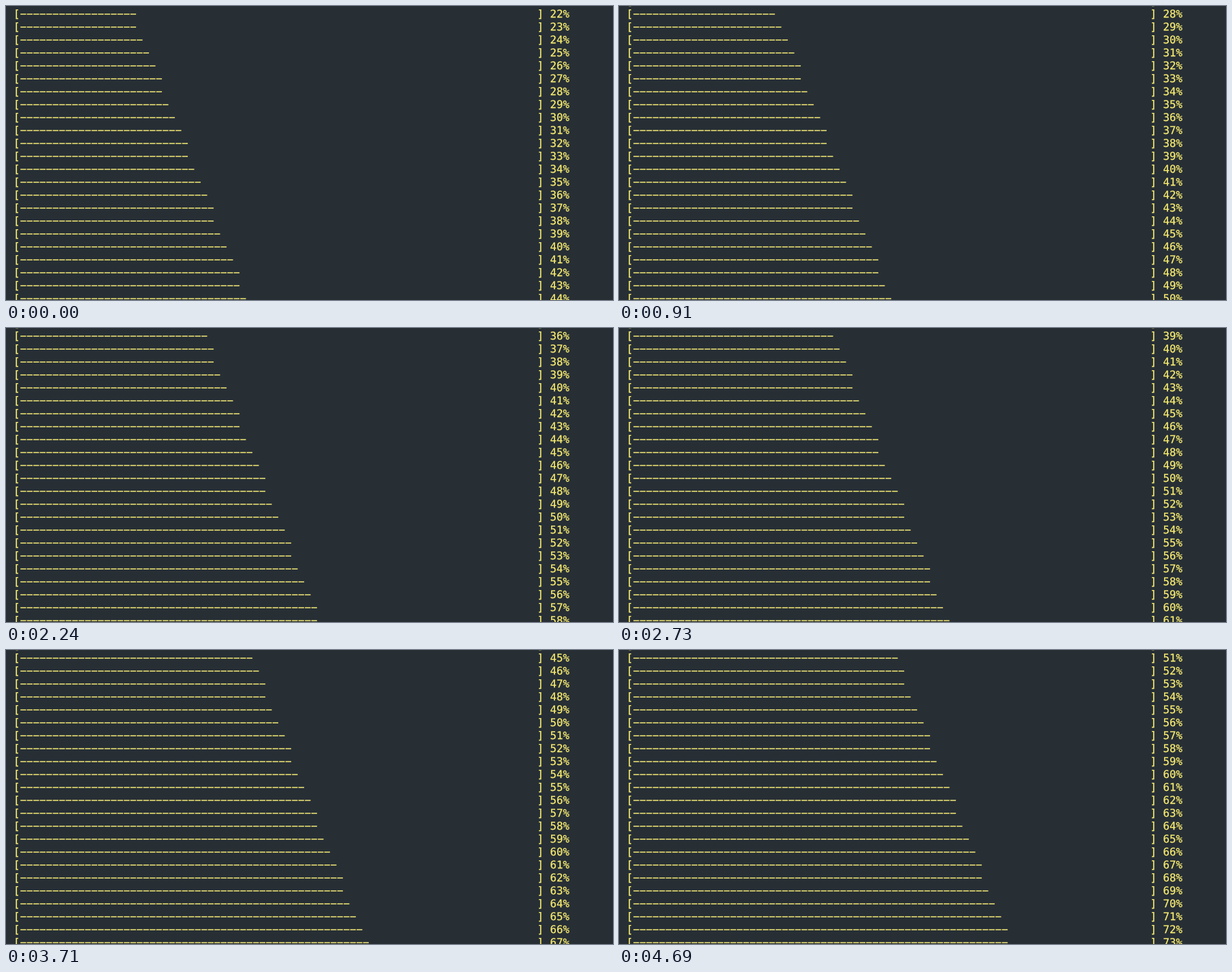
Recreate the animation shown at these times as an HTML page. Size 892 px wide and 432 px high, loop 4.76 s.

```html
<!DOCTYPE html>
<html lang="en">
<head>
<meta charset="utf-8">
<title>Progress bar</title>
<style>
  html, body { margin: 0; width: 100%; height: 100%; overflow: hidden; background: #272f35; }
  svg { display: block; width: 892px; height: 432px; }
  text {
    font: 15.78px "DejaVu Sans Mono", monospace;
    fill: #f9ed72; stroke: #f9ed72; stroke-width: .25;
    text-rendering: geometricPrecision;
  }
  line { stroke: #f5e976; stroke-width: 1.6; stroke-dasharray: 8.4 1.1; }
</style>
</head>
<body>
<svg viewBox="0 0 892 432"><g id="log"></g></svg>
<script>
const LOOP = 4760, TICK = 70;
const CELL = 9.5, ROW = 19, LEFT = 11, BAR = 80;
const FIRST = 22, LAST = 73;
// ticks between one scrolled line and the next
const GAPS = "13232232223232232232223222322" + "";
const log = document.getElementById("log");

function add(tag, attrs, label) {
  const el = document.createElementNS("http://www.w3.org/2000/svg", tag);
  for (const key in attrs) el.setAttribute(key, attrs[key]);
  if (label) el.textContent = label;
  log.append(el);
}

const col = n => LEFT + n * CELL;

for (let p = FIRST; p <= LAST; p++) {
  const top = (p - FIRST) * ROW;
  const y = top + 17;
  const dashes = Math.round(p * BAR / 100);
  add("text", { x: col(0), y }, "[");
  add("line", { x1: col(1) + .7, x2: col(1 + dashes), y1: top + 12, y2: top + 12 });
  add("text", { x: col(BAR + 1), y }, "]");
  add("text", { x: col(BAR + 3), y }, p + "%");
}

const frame = (tick, lines) => ({
  offset: tick * TICK / LOOP,
  transform: `translateY(${-lines * ROW}px)`,
  easing: "step-end"
});

const steps = [1, 4, 6, 9, 11, 13, 16, 18, 20, 22, 25, 27, 30, 32, 34,
  37, 39, 41, 44, 46, 48, 50, 53, 55, 57, 60, 62, 64, 67];
const frames = [frame(0, 0), ...steps.map((t, i) => frame(t, i + 1)),
  frame(LOOP / TICK, steps.length)];
log.animate(frames, { duration: LOOP, iterations: Infinity });
</script>
</body>
</html>
```
